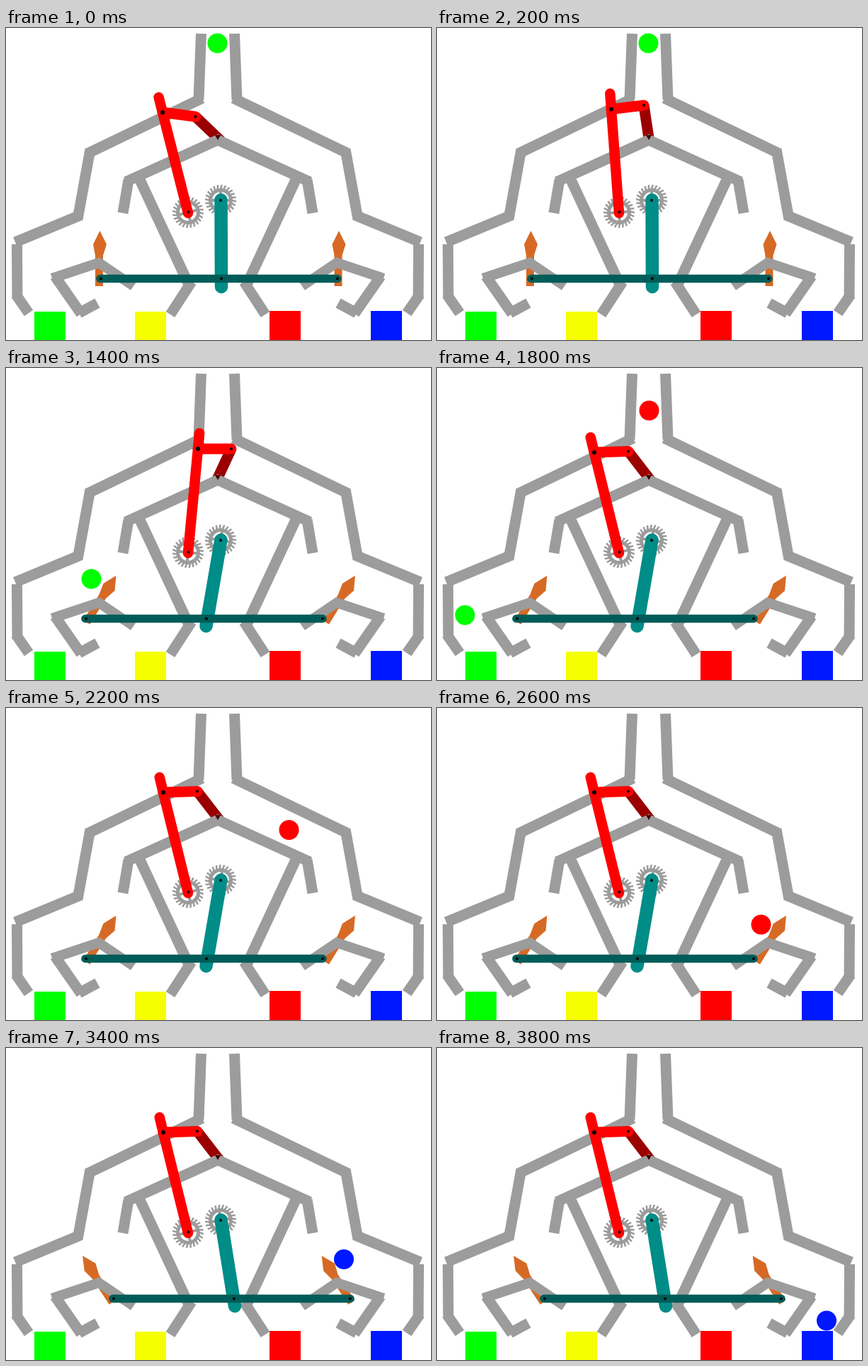
An HTML page with a canvas that plays this animation: 600x440 px, repeating every 4 s.

```html
<!DOCTYPE html>
<html lang="en">
<head>
<meta charset="utf-8">
<title>Ball sorter</title>
<style>
html, body { margin: 0; width: 100%; height: 100%; overflow: hidden; background: #fff; }
canvas { display: block; }
</style>
</head>
<body>
<canvas id="stage" width="600" height="440"></canvas>
<script>
const ctx = document.getElementById('stage').getContext('2d');
const STEP = 200, STEPS = 20;
const GREEN = '#00ff00', RED = '#ff0000', BLUE = '#0018ff', YELLOW = '#f5ff00';
const GREY = '#9c9c9c';

// Left half of the track; the right half mirrors it around x = 299.
const walls = [
  [275.5, 8, 272, 101], [277, 99, 115, 177], [119, 171, 101, 270], [105, 264, 13, 302],
  [15.5, 305, 16, 382], [14, 376, 32, 402],
  [173, 214, 165, 261], [188, 212, 260, 366], [262, 358, 232, 404],
  [69, 350, 106, 403], [103, 402, 129, 388]
];

// Ball positions, one per step, from the given first step on.
const balls = [
  { color: GREEN, first: 0, path: [[298.5, 21.5], [298.5, 21.5], [298.5, 77], [292, 118.5], [258, 145],
    [181, 181], [137, 235], [120.5, 297.5], [93, 330], [39.5, 348.5], [59, 388]] },
  { color: RED, first: 8, path: [[299, 10], [299.5, 60], [312, 122], [399.5, 172], [467, 238],
    [457.5, 305.5], [428, 337], [392.5, 393]] },
  { color: BLUE, first: 14, path: [[298.5, 21.5], [365, 163.5], [455, 220], [477, 298], [553, 333.5], [550, 384.5]] }
];

const bins = [[40, 400, GREEN], [182, 400, YELLOW], [372, 399, RED], [515, 399, BLUE]];

// Lever pivot, link joint and gear turn of each gate pose.
const gates = {
  start: { pivot: [221, 119], joint: [267.5, 125], turn: -0.25 },
  left: { pivot: [222, 119], joint: [270, 117.5], turn: -0.24 },
  middle: { pivot: [246, 114.5], joint: [292, 109], turn: -0.07 },
  right: { pivot: [271, 114], joint: [318, 114], turn: 0.1 }
};

// Bar offset, pendulum end, paddle angle and gear turn.
const swings = {
  center: { bar: 0, end: [304, 365], tilt: 0, turn: 0 },
  left: { bar: -21, end: [282.5, 364], tilt: 0.55, turn: 0.17 },
  right: { bar: 18, end: [323, 364], tilt: -0.585, turn: -0.16 }
};

function line(color, width, cap, ...points) {
  ctx.strokeStyle = color;
  ctx.lineWidth = width;
  ctx.lineCap = cap;
  ctx.beginPath();
  points.forEach(p => ctx.lineTo(...p));
  ctx.stroke();
}

function dot(x, y, r, color = '#000') {
  ctx.fillStyle = color;
  ctx.beginPath();
  ctx.arc(x, y, r, 0, 7);
  ctx.fill();
}

function fillShape(color, points) {
  ctx.fillStyle = color;
  ctx.beginPath();
  points.forEach(p => ctx.lineTo(...p));
  ctx.fill();
}

function placed(x, y, angle, draw) {
  ctx.save();
  ctx.translate(x, y);
  ctx.rotate(angle);
  draw();
  ctx.restore();
}

function gear(x, y, turn) {
  placed(x, y, turn, () => {
    ctx.strokeStyle = GREY;
    ctx.lineWidth = 5;
    ctx.beginPath();
    ctx.arc(0, 0, 14.5, 0, 7);
    ctx.stroke();
    for (let i = 0; i < 24; i++) {
      const a = i * Math.PI / 12, b = a + 0.08;
      line(GREY, 2.6, 'butt', [16 * Math.cos(a), 16 * Math.sin(a)], [22 * Math.cos(b), 22 * Math.sin(b)]);
    }
    line(GREY, 4, 'butt', [-14, 0], [14, 0]);
    line(GREY, 4, 'butt', [0, -14], [0, 14]);
  });
}

function paddle(x, tilt) {
  placed(x, 330, tilt, () => fillShape('#d66a25', [
    [0.5, -44], [10, -25], [5, -9], [5, 34], [-6, 34], [-6, -9], [-9, -25]
  ]));
}

function drawWalls() {
  for (const [x1, y1, x2, y2] of walls) {
    line(GREY, 15, 'butt', [x1, y1], [x2, y2]);
    line(GREY, 15, 'butt', [598 - x1, y1], [598 - x2, y2]);
  }
  line(GREY, 15, 'butt', [169, 217], [299, 158], [429, 217]);
  line(GREY, 14, 'butt', [65, 353], [131, 331], [180, 364]);
  line(GREY, 14, 'butt', [533, 353], [467, 331], [418, 364]);
}

function drawGate({ pivot: [px, py], joint, turn }) {
  const base = [257, 261], k = 1.15;
  const tip = [base[0] + (px - base[0]) * k, base[1] + (py - base[1]) * k];
  gear(257, 260, turn);
  line(RED, 15, 'round', [px, py], joint);
  line(RED, 14.5, 'round', base, tip);
  dot(px, py, 3);
  dot(...joint, 2);
  dot(257.5, 259.5, 2);
}

function drawFlap([jx, jy]) {
  const dx = 299 - jx, dy = 155 - jy, k = 1 + 6 / Math.hypot(dx, dy);
  line('#9b0000', 15, 'butt', [jx, jy], [jx + dx * k, jy + dy * k]);
}

function drawSwing({ bar, end, turn }) {
  gear(303, 243, turn);
  line('#008c87', 18.5, 'round', [303.5, 242.5], end);
  line('#005c58', 11.5, 'round', [133 + bar, 353.5], [468 + bar, 353.5]);
  dot(303, 243, 2);
  for (const x of [134, 304, 468]) dot(x + bar, 353.5, 2);
}

function draw(step) {
  const gate = step === 0 ? gates.start
    : step === 1 || step === 8 ? gates.middle
    : step < 8 ? gates.right : gates.left;
  const swing = step < 3 ? swings.center : step < 15 ? swings.left : swings.right;

  ctx.fillStyle = '#fff';
  ctx.fillRect(0, 0, 600, 440);
  paddle(132, swing.tilt);
  paddle(469.5, swing.tilt);
  for (const { color, first, path } of balls) {
    const spot = path[step - first];
    if (spot) dot(...spot, 14, color);
  }
  drawFlap(gate.joint);
  drawWalls();
  fillShape('#4a0000', [[295, 151], [303, 151], [299, 158]]);
  for (const [x, y, color] of bins) {
    ctx.fillStyle = color;
    ctx.fillRect(x, y, 44, 440 - y);
  }
  drawGate(gate);
  drawSwing(swing);
}

function tick() {
  draw(Math.floor(performance.now() / STEP) % STEPS);
  requestAnimationFrame(tick);
}
tick();
</script>
</body>
</html>
```
